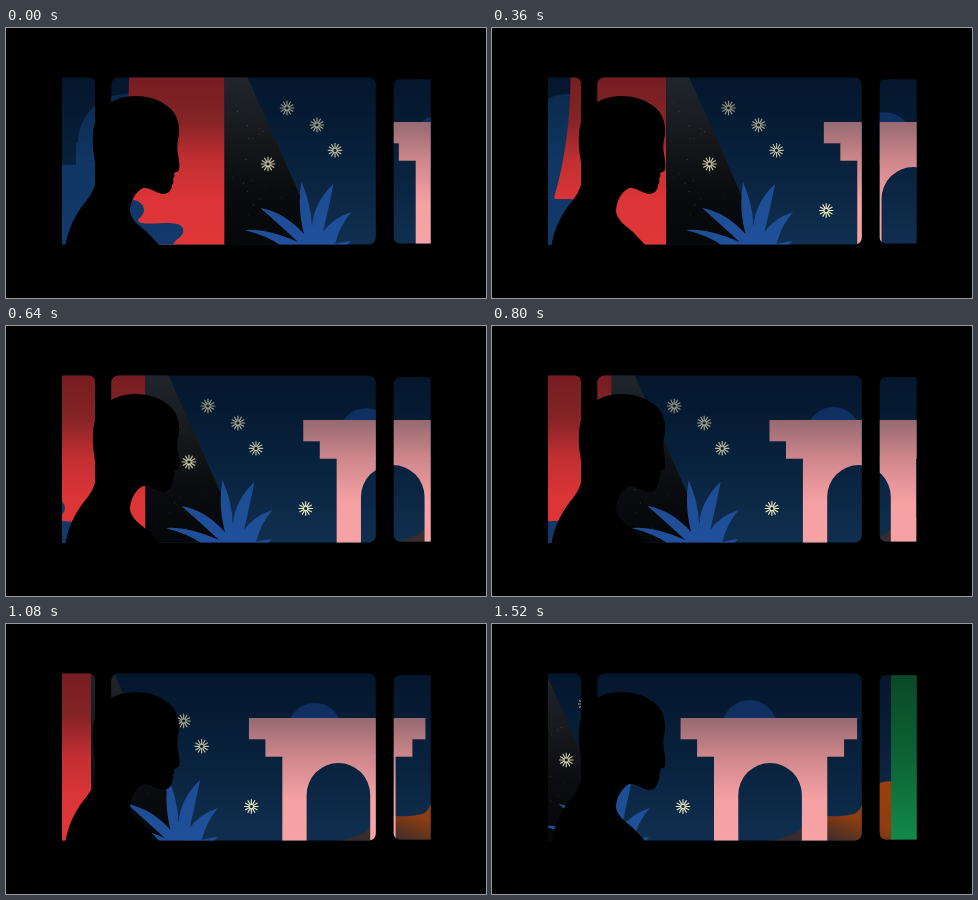
An HTML page with a canvas for the animation above (1560 ms loop, 480x270 px).

```html
<!DOCTYPE html>
<html lang="en">
<head>
<meta charset="utf-8">
<title>Night train</title>
<style>
html, body { margin: 0; width: 100%; height: 100%; overflow: hidden; background: #000; }
canvas { display: block; width: 480px; height: 270px; }
</style>
</head>
<body>
<canvas id="stage" width="480" height="270"></canvas>
<script>
const ctx = document.getElementById('stage').getContext('2d');
const LOOP = 1560, STEP = 40, SPEED = 0.1235;
const TOP = 49.5, BOTTOM = 216.5;

function shade(...colors) {
  const g = ctx.createLinearGradient(0, TOP, 0, BOTTOM);
  colors.forEach((c, i) => g.addColorStop(i / (colors.length - 1), c));
  return g;
}

const paint = {
  sky: shade('#04162c', '#08213c', '#102f50'),
  blue: shade('#0a2748', '#103663', '#12396b'),
  dome: shade('#0e2c5a', '#17397a'),
  red: shade('#761d21', '#842326', '#c32f32', '#dd3537', '#df3638'),
  beam: shade('#20252d', '#17191d', '#0b0c0f', '#050608'),
  plant: shade('#173c70', '#1d4a90', '#20509b'),
  pink: shade('#6e505b', '#92676f', '#cf878c', '#f5a0a3', '#f7a3a6'),
  green: shade('#094826', '#0d6335', '#13894a'),
  star: shade('#77786a', '#a9aa91', '#e0dfb5', '#fff8c6')
};

const rockPaint = ctx.createLinearGradient(545, 150, 520, 217);
rockPaint.addColorStop(0, '#9a3f0b');
rockPaint.addColorStop(0.55, '#8e3c10');
rockPaint.addColorStop(1, '#382b2c');

const shape = (fill, d) => {
  ctx.fillStyle = fill;
  ctx.fill(new Path2D(d));
};
const rect = (fill, x, y, w, h) => {
  ctx.fillStyle = fill;
  ctx.fillRect(x, y, w, h);
};
const disc = (fill, x, y, r) => {
  ctx.fillStyle = fill;
  ctx.beginPath();
  ctx.arc(x, y, r, 0, Math.PI * 2);
  ctx.fill();
};

function star(x, y) {
  ctx.strokeStyle = paint.star;
  ctx.lineWidth = 1.15;
  ctx.beginPath();
  for (let i = 0; i < 12; i++) {
    const a = i * Math.PI / 6, c = Math.cos(a), s = Math.sin(a);
    ctx.moveTo(x + c * 1.6, y + s * 1.6);
    ctx.lineTo(x + c * 7.2, y + s * 7.2);
  }
  ctx.stroke();
}

const random = seed => {
  const v = Math.sin(seed * 91.7) * 43758.5453;
  return v - Math.floor(v);
};

function sparks() {
  for (let i = 1; i <= 26; i++) {
    const y = 55 + random(i) * 155;
    const x = 221 + random(i + 50) * (18 + (y - TOP) * 0.42);
    rect(`rgba(200,170,110,${0.12 + random(i + 90) * 0.3})`, x, y, 0.9, 0.9);
  }
}

function oldTown() {
  shape(paint.blue, 'M20 217V137H70V115H92V217Z');
  disc(paint.blue, 121, 115, 49);
  rect(paint.blue, 72, 115, 98, 102);
  shape(paint.red, 'M123 49Q122.500 115 107 168V217H218.500V49Z');
  shape(paint.blue, 'M100 217V171H121C132 171 138 176 138 182C138 188 132 190 132 193' +
    'C134 197 150 195 163 195C174 195 179 199 177 205C175 210 168 212 167 217Z');
}

function plant() {
  shape(paint.plant, 'M280 222Q266 209 238.500 202Q260 200 292 214' +
    'Q276 199 254.500 180Q278 184 298 206Q291 180 295.500 154Q305 176 306 198' +
    'Q308 174 327.500 156Q324 174 317 204Q327 190 345.500 184Q334 197 329 216' +
    'Q337 214 345 213L336 222Z');
}

function arch() {
  rect(paint.pink, 376.3, 94, 176.5, 21.3);
  rect(paint.pink, 392.8, 115, 147, 17.7);
  shape(paint.pink, 'M409.700 132V217H434V171A31.800 32 0 0 1 497.600 171V217H523V132Z');
}

function scenery(t) {
  rect(paint.sky, 50, 45, 380, 176);
  ctx.save();
  ctx.translate(-SPEED * t, 0);
  oldTown();
  shape(paint.beam, 'M218.500 49H241.500L316 217H218.500Z');
  sparks();
  for (const [x, y] of [[281, 80], [311, 97], [329, 122.3], [262, 136], [378.7, 182.5]]) star(x, y);
  plant();
  ctx.restore();

  // The distant dome drifts a little slower and rises.
  disc(paint.dome, 434.6 - 0.1165 * t, 113.7 - 0.0071 * t, 27);

  ctx.save();
  ctx.translate(-SPEED * t, 0);
  shape(rockPaint, 'M468 217C480 212 490 212 498 203C506 194 514 191 523 192' +
    'C535 193 545 191 550 190C558 186 558 178 562 169C567 160 577 157 592 157V217Z');
  arch();
  rect(paint.green, 586.8, 45, 80, 176);
  ctx.restore();
}

function clipWindows() {
  ctx.beginPath();
  ctx.roundRect(56, 49.5, 33, 167, [0, 6, 6, 0]);
  ctx.roundRect(105.3, 49.5, 264.5, 167, 7);
  ctx.roundRect(387.7, 51.3, 37, 164.3, [6, 0, 0, 6]);
  ctx.clip();
}

function passenger() {
  shape('#000', 'M59 220C62 200 70 185 81 172C88 163 91 154 90 143C89 131 86 121 87 107' +
    'C88 82 106 68 129 68C151 68 169 79 172 94C174 102 173 107 172 112' +
    'C171 117 171 121 172 126C173 132 174 138 173 142C172 144 169 144 168 145' +
    'C169 148 168 149 167 151C168 154 167 155 166 157C166 162 162 166 157 166' +
    'C150 165 144 159 137 160C129 164 124 174 124 184C126 193 134 198 141 204L156 220Z');
}

function draw(t) {
  ctx.fillStyle = '#000';
  ctx.fillRect(0, 0, 480, 270);
  ctx.save();
  clipWindows();
  scenery(t);
  ctx.restore();
  passenger();
}

function tick() {
  draw(Math.floor(performance.now() % LOOP / STEP) * STEP);
  requestAnimationFrame(tick);
}
tick();
</script>
</body>
</html>
```
